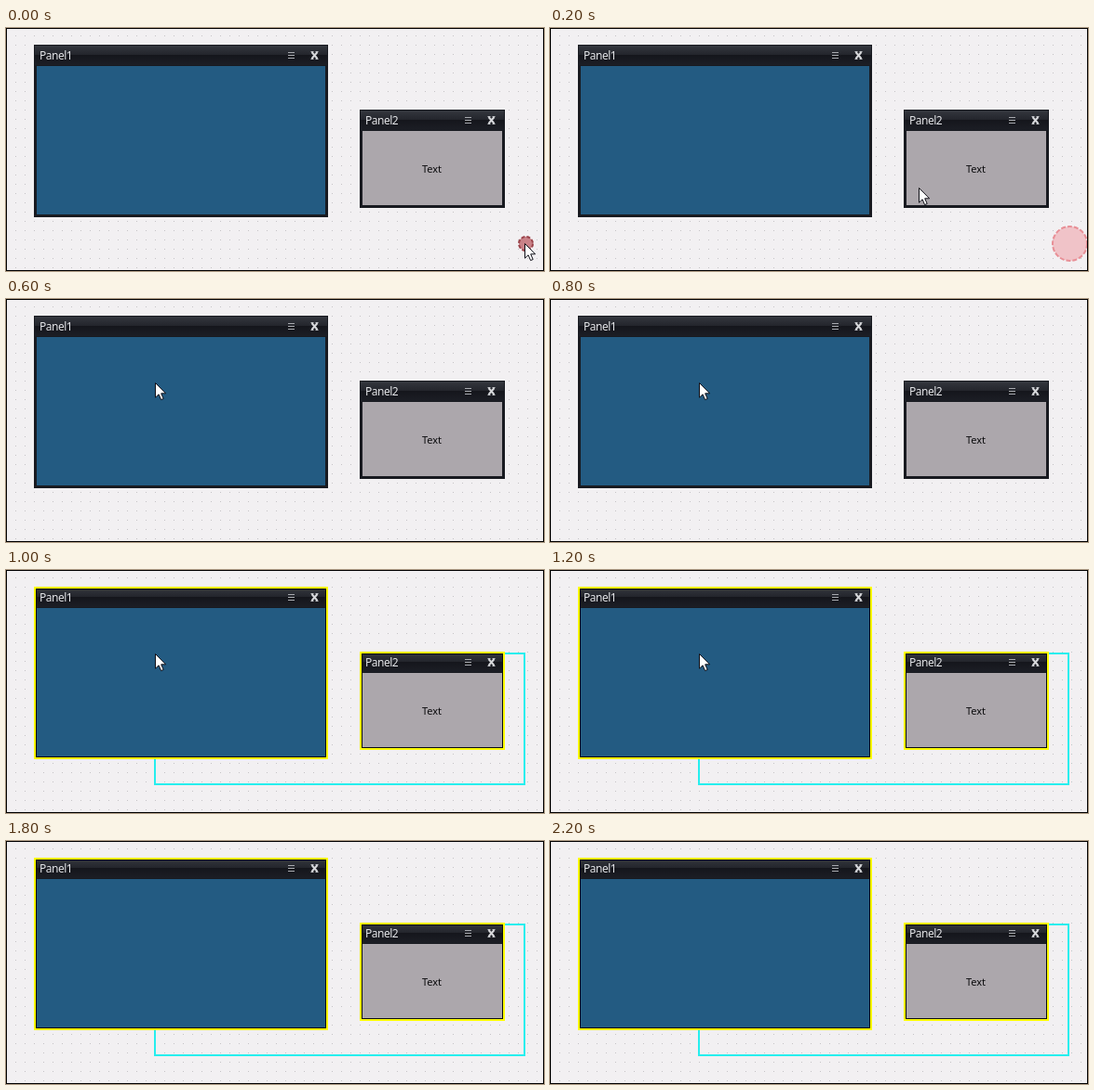
An HTML page that plays this animation: 578 px wide and 262 px high, repeating every 6800 ms.

```html
<!DOCTYPE html>
<html lang="en">
<head>
<meta charset="utf-8">
<title>Linked panels</title>
<style>
  html, body { margin: 0; width: 100%; height: 100%; overflow: hidden; }
  svg { display: block; width: 578px; height: 262px; }
  text { font-family: "Noto Sans", "Open Sans", sans-serif; }
  .title { font-size: 12px; letter-spacing: -.5px; fill: #e4e5e8; }
  .label { font-size: 11px; fill: #0c0c0e; text-anchor: middle; }
</style>
</head>
<body>
<svg viewBox="0 0 578 262">
  <defs>
    <pattern id="dots" width="10" height="10" patternUnits="userSpaceOnUse" y="8">
      <rect width="1" height="1" fill="#c5c3c6"/>
    </pattern>
    <linearGradient id="bar" x2="0" y2="1">
      <stop offset="0" stop-color="#34373e"/>
      <stop offset=".45" stop-color="#24262d"/>
      <stop offset=".5" stop-color="#15161c"/>
      <stop offset="1" stop-color="#1c1e25"/>
    </linearGradient>
  </defs>
  <rect width="578" height="262" fill="#f2f0f2"/>
  <rect width="578" height="262" fill="url(#dots)"/>
  <path id="link" d="M160 204V231H557V90H536" fill="none" stroke="#26eeee" stroke-width="2"/>
  <g id="panels"></g>
  <text class="label" x="457.5" y="156">Text</text>
  <circle id="ripple" cx="558.5" cy="232.5" stroke-width="2"/>
  <rect x=".5" y=".5" width="577" height="261" fill="none" stroke="#000"/>
  <path id="cursor" d="M.5 .5V16.2L4.1 12.8L6.6 18.6L9.2 17.5L6.7 11.8H11.6Z"
        fill="#fff" stroke="#101018" stroke-linejoin="round"/>
</svg>
<script>
const LOOP = 6800;
const $ = id => document.getElementById(id);

function panel(x, y, w, h, name, color) {
  const menuX = w - 43, closeX = w - 18;
  return `<g transform="translate(${x} ${y})">
    <rect width="${w}" height="${h}" fill="#181a20"/>
    <rect x="1" y="1" width="${w - 2}" height="21" fill="url(#bar)"/>
    <rect x="3" y="23" width="${w - 6}" height="${h - 26}" fill="${color}"/>
    <text class="title" x="6" y="16">${name}</text>
    <path d="M${menuX} 8.5h7m-7 3h7m-7 3h7" stroke="#a9abb0"/>
    <path d="M${closeX + .5} 8l6 7m0 -7l-6 7" stroke="#d6d7da" stroke-width="2"/>
    <path d="M${closeX - .5} 7.5h3m2 0h3m-8 8h3m2 0h3" stroke="#c2c4c8"/>
    <g class="selection" fill="none">
      <rect x="2.5" y="2.5" width="${w - 5}" height="${h - 5}" stroke="#0b0c10"/>
      <rect x="1" y="1" width="${w - 2}" height="${h - 2}" stroke="#ffff00" stroke-width="2"/>
    </g>
  </g>`;
}

$("panels").innerHTML =
  panel(30, 18, 316, 186, "Panel1", "#235b82") +
  panel(380, 88, 156, 106, "Panel2", "#aca7ac");

const cursorSteps = [
  [0, [557, 232]], [200, [396, 172]], [400, [229, 120]], [600, [160, 90]], [1600, null]
];
const rippleSteps = [
  [0, { r: 7.5, fill: "#c98288", stroke: "#9a4249", "stroke-dasharray": "4 2" }],
  [200, { r: 18.5, fill: "#f0c3c8", stroke: "#e88f96", "stroke-dasharray": "5 2" }],
  [400, null]
];
const selectSteps = [[0, false], [1000, true]];

const at = (steps, t) => steps.findLast(([start]) => start <= t)[1];
const show = (el, on) => el.style.visibility = on ? "visible" : "hidden";
const selected = [$("link"), ...document.querySelectorAll(".selection")];

function draw() {
  const t = performance.now() % LOOP;
  const tip = at(cursorSteps, t);
  show($("cursor"), tip);
  if (tip) $("cursor").setAttribute("transform", `translate(${tip})`);

  const ripple = at(rippleSteps, t);
  show($("ripple"), ripple);
  for (const key in ripple) $("ripple").setAttribute(key, ripple[key]);

  selected.forEach(el => show(el, at(selectSteps, t)));
  requestAnimationFrame(draw);
}
draw();
</script>
</body>
</html>
```
